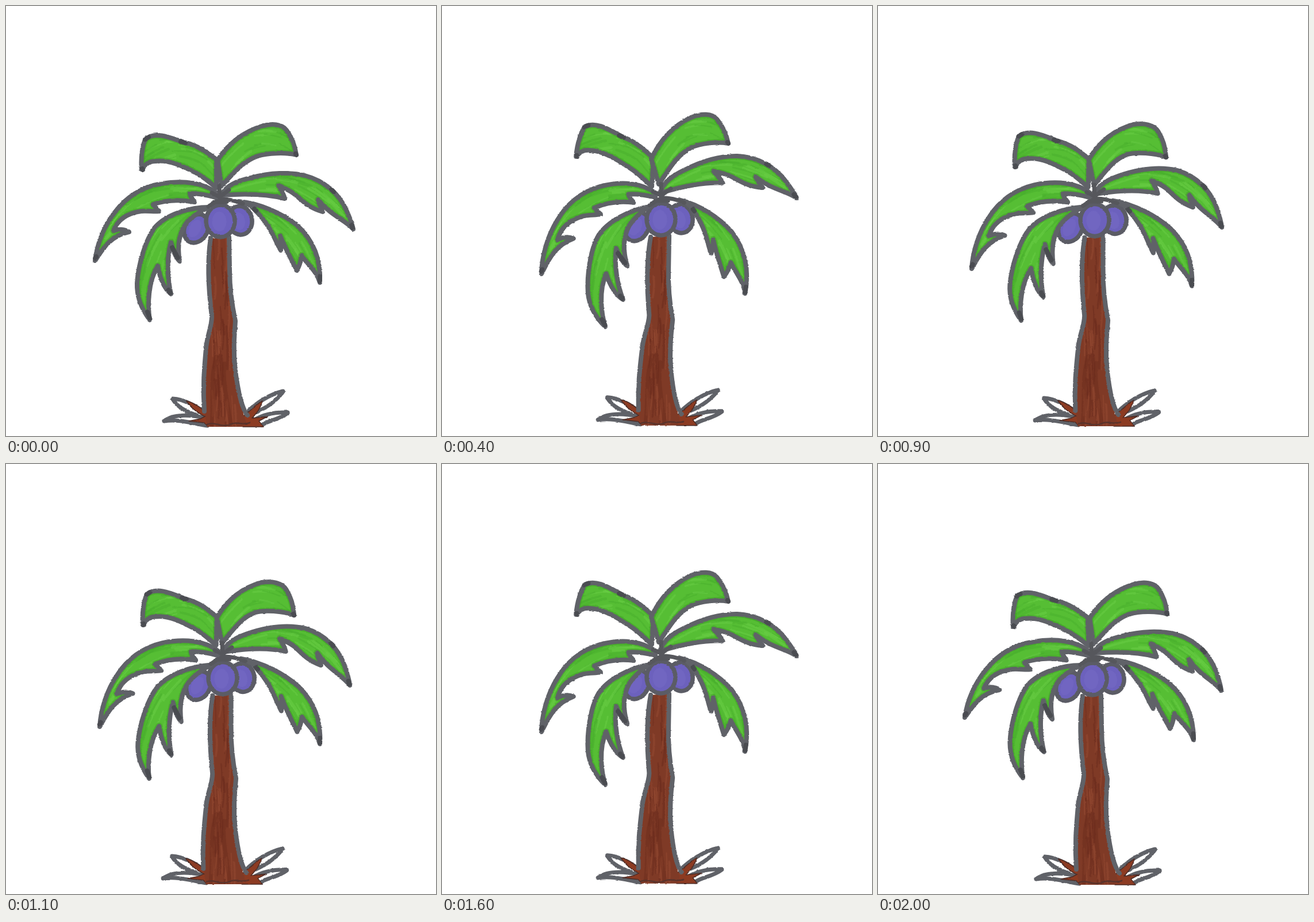
An HTML page that plays this animation: 748 by 748 pixels, repeating every 2100 ms.

```html
<!DOCTYPE html>
<html lang="en">
<head>
<meta charset="utf-8">
<title>Swaying palm</title>
<style>
  html, body { margin: 0; width: 100%; height: 100%; overflow: hidden; background: #fff; }
  svg { display: block; width: 100vw; height: 100vh; }
</style>
</head>
<body>
<svg id="stage" viewBox="0 0 748 748">
  <defs>
    <filter id="rough" x="0" y="0" width="748" height="748" filterUnits="userSpaceOnUse" color-interpolation-filters="sRGB">
      <feTurbulence type="fractalNoise" baseFrequency=".12 .4" numOctaves="2" seed="4"/>
      <feDisplacementMap in="SourceGraphic" scale="2.5" xChannelSelector="R" yChannelSelector="G"/>
    </filter>
  </defs>
  <g id="palm" filter="url(#rough)" stroke-linecap="round" stroke-linejoin="round"></g>
</svg>
<script>
const palm = document.getElementById('palm');
const defs = document.querySelector('defs');
const INK = '#606268', DARK_INK = '#45464b', BROWN = '#7f3a26';
const STEP = 100, LOOP = 2100;

// Sway poses sit at these phases; the first is the far left end.
const PHASES = [-1, 0, 1, 2, 4, 5];
const SWAY = [0, 0, .5, .8, 1, 1.1];

// Spine points are base, middle, tip; shifts are x,y pairs per pose.
const LEAVES = [
  { d: 'M353,350 C320,350 280,362 260,384 C243,405 230,450 228,482 C227,510 238,530 250,546 C246,520 247,480 264,452 C268,475 276,492 287,501 C281,475 279,440 287,411 C291,428 296,438 302,444 C298,420 300,395 315,376 C325,365 340,356 353,350Z',
    spine: [[352, 352], [270, 425], [250, 546]], root: [7, -1], width: 28,
    mid: [1,0, 0,0, 3,4, 7,8, 18,13, 22,14], tip: [2,0, 0,0, -1,1, 5,5, 34,12, 43,13],
    ink: 'M289,420 L299,438 M246,532 L250,543 M283,494 L286,499' },
  { d: 'M405,340 C440,343 480,360 507,382 C535,408 548,440 546,481 C541,462 525,450 514,434 C513,445 510,453 506,460 C496,440 485,420 477,400 C479,410 479,417 478,425 C466,405 463,385 432,354 C428,348 418,342 405,340Z',
    spine: [[410, 340], [495, 390], [546, 482]], root: [8, -2], width: 24,
    mid: [0,0, 0,0, 2,5, 0,8, -4,9, -5,10], tip: [3,-1, 0,0, 0,6, -4,12, -19,19, -23,21],
    ink: 'M546,470 L546,479 M432,353 L435,356' },
  { d: 'M368,326 C345,308 310,302 270,309 C235,315 208,334 190,358 C170,383 158,415 155,443 C167,425 180,400 214,393 C204,387 193,389 187,391 C193,375 207,361 235,357 C247,356 257,358 266,357 C260,351 258,348 256,345 C280,337 305,337 328,341 C323,334 320,330 320,326 C340,326 355,330 368,334Z',
    spine: [[368, 330], [240, 335], [155, 443]], root: [3, -1], width: 26,
    mid: [-1,0, 0,0, 3,4, 6,5, 8,8, 8,9], tip: [-4,-2, 0,0, 8,14, 14,17, 18,23, 19,25],
    ink: 'M155,439 L157,436' },
  { d: 'M376,326 C385,312 400,305 425,299 C455,291 490,288 520,295 C555,304 580,328 592,355 C598,368 602,378 604,388 C590,372 565,365 543,337 C545,346 548,352 551,358 C530,352 520,343 505,330 C497,322 485,317 474,312 C479,320 483,327 485,335 C465,330 430,325 378,329Z',
    spine: [[376, 325], [500, 308], [604, 389]], root: [4, -4], width: 24,
    mid: [0,1, 0,0, 1,-9, 1,-17, -3,-30, -4,-35], tip: [-7,6, 0,0, -6,-3, -3,-17, 13,-54, 18,-67],
    ink: 'M566,319 L570,323 M601,381 L603,386' },
  { d: 'M237,285 C240,278 246,270 260,270 C285,267 310,280 330,290 C345,298 355,308 366,316 L366,267 C350,255 335,243 312,238 C290,231 262,217 243,231 C238,240 234,262 236,285Z',
    spine: [[368, 300], [310, 258], [238, 286]], root: [0, -2], width: 34,
    mid: [-2,0, 0,0, 1,-3, 2,-7, 1,-10, 1,-13], tip: [-1,-2, 0,0, 2,-5, 0,-12, -3,-23, -4,-28],
    ink: 'M242,232 L248,228 M304,236 L312,238 M237,283 L238,285' },
  { d: 'M368,268 C388,238 415,218 445,209 C462,204 480,205 488,216 C497,228 503,245 505,259 C485,254 455,256 438,261 C410,271 395,292 375,313Z',
    spine: [[370, 298], [435, 237], [505, 260]], root: [0, -2], width: 34,
    mid: [0,0, 0,0, -3,-3, -6,-6, -8,-14, -9,-18], tip: [-2,2, 0,0, -4,4, -7,2, -7,-20, -6,-26],
    ink: 'M504,257 L505,259' }
];

const TRUNK_LEFT = 'M356,404 C349,450 353,500 358,540 C358,558 350,572 348,595 C345,630 342,660 345,705';
const TRUNK_RIGHT = 'M388,402 L389,460 C389,490 392,515 399,548 C397,575 395,600 399,635 C403,665 410,700 420,712';
const TRUNK_FILL = TRUNK_LEFT + ' L350,732 L413,732 L418,724 C410,705 403,665 399,635 C395,600 397,575 399,548 C392,515 389,490 389,460 L388,402Z';
const GRASS = 'M290,683 C310,684 330,696 348,708 M290,684 C298,697 310,704 332,712 M275,722 C292,709 320,711 345,716 M275,722 C300,718 325,726 350,730 M482,670 C460,675 435,690 418,708 M482,671 C470,687 455,698 436,706 M490,707 C465,706 445,712 432,720 M490,708 C475,720 455,721 445,729';
const ROOTS = 'M314,687 C330,691 340,700 351,710 L352,732 L345,725 L318,722 L338,718 L346,714 C332,707 321,699 314,687Z M446,687 C436,692 424,706 413,713 L412,732 L448,732 L440,722 L455,714 L428,717 C436,708 443,700 446,687Z';
const CROWN = 'M352,349 C360,343 367,338 374,336 C388,336 400,339 412,344 M358,325 L372,332 L388,320 M371,312 L372,338 M362,341 L384,341';

let seed = 11;
const random = () => (seed = seed * 16807 % 2147483647) / 2147483647;
const between = (a, b) => a + (b - a) * random();

function add(parent, tag, attrs) {
  const node = document.createElementNS('http://www.w3.org/2000/svg', tag);
  for (const key in attrs) node.setAttribute(key, attrs[key]);
  return parent.appendChild(node);
}

const parts = [];
function addPath(parent, d, warp, fill, stroke = 'none', width = 0, opacity = 1) {
  const node = add(parent, 'path', { fill, stroke, 'stroke-width': width, opacity });
  parts.push({ node, d, warp });
}

function addClip(id, d, warp) {
  addPath(add(defs, 'clipPath', { id }), d, warp, '#000');
  return add(palm, 'g', { 'clip-path': `url(#${id})` });
}

const pair = ([x, y]) => `${x.toFixed(1)},${y.toFixed(1)}`;
const warpPath = (d, warp) => d.replace(/(-?[\d.]+),(-?[\d.]+)/g, (_, x, y) => pair(warp(+x, +y)));

function keyed(values, phase, size, offset) {
  let i = 0;
  while (i < PHASES.length - 2 && phase > PHASES[i + 1]) i++;
  const k = (phase - PHASES[i]) / (PHASES[i + 1] - PHASES[i]);
  const a = values[i * size + offset], b = values[(i + 1) * size + offset];
  return a + (b - a) * k;
}

let phase = 0, sway = 0;

// Trunk, roots and crown lean together.
const lean = (x, y) => [x + sway * (-4 + (730 - y) / 325 * 11), y - sway * 2.2];

const along = (s, u) => [0, 1].map(k =>
  s[0][k] * (1 - u) * (1 - 2 * u) + s[1][k] * 4 * u * (1 - u) + s[2][k] * u * (2 * u - 1));
const heading = (s, u) => {
  const [dx, dy] = [0, 1].map(k =>
    s[0][k] * (4 * u - 3) + s[1][k] * (4 - 8 * u) + s[2][k] * (4 * u - 1));
  return Math.atan2(dy, dx);
};

// Carries a point along with the bending spine of its leaf.
function bend(leaf) {
  return (x, y) => {
    const [base, , tip] = leaf.spine;
    const cx = tip[0] - base[0], cy = tip[1] - base[1];
    const t = ((x - base[0]) * cx + (y - base[1]) * cy) / (cx * cx + cy * cy);
    const u = Math.max(0, Math.min(1, t));
    const [sx, sy] = along(leaf.spine, u), [px, py] = along(leaf.posed, u);
    const turn = heading(leaf.posed, u) - heading(leaf.spine, u);
    const c = Math.cos(turn), s = Math.sin(turn);
    return [px + (x - sx) * c - (y - sy) * s, py + (x - sx) * s + (y - sy) * c];
  };
}

function poseLeaf(leaf) {
  const shifts = [
    leaf.root.map(v => v * sway),
    [0, 1].map(k => keyed(leaf.mid, phase, 2, k)),
    [0, 1].map(k => keyed(leaf.tip, phase, 2, k))
  ];
  leaf.posed = leaf.spine.map((p, i) => p.map((v, k) => v + shifts[i][k]));
}

function leafStreak(leaf) {
  const start = between(0, .85), length = between(.12, .3), offset = between(-leaf.width, leaf.width);
  const at = u => {
    const [x, y] = along(leaf.spine, u), a = heading(leaf.spine, u);
    return pair([x - Math.sin(a) * offset, y + Math.cos(a) * offset]);
  };
  return `M${at(start)} Q${at(start + length / 2)} ${at(start + length)}`;
}

function buildTrunk() {
  addPath(palm, GRASS, lean, 'none', INK, 7);
  addPath(palm, ROOTS, lean, '#8c3b22', '#4d2d27', 1.5);
  addPath(palm, TRUNK_FILL, lean, BROWN);
  const grain = addClip('trunk', TRUNK_FILL, lean);
  for (let i = 0; i < 46; i++) {
    const y = between(400, 700), x = between(352, 392) + (y > 600 ? between(-6, 10) : 0);
    const length = between(25, 75);
    const streak = `M${pair([x, y])} Q${pair([x + 3, y + length / 2])} ${pair([x + between(-2, 4), y + length])}`;
    addPath(grain, streak, lean, 'none', i % 2 ? '#6b2b1c' : '#964a33', between(1.5, 4), .5);
  }
  addPath(grain, 'M366,610 C354,650 362,680 358,728 M380,622 C376,650 385,690 391,725', lean, 'none', '#682a1a', 7, .4);
  addPath(palm, TRUNK_LEFT, lean, 'none', INK, 8);
  addPath(palm, TRUNK_RIGHT, lean, 'none', INK, 8);
  addPath(palm, 'M350,728 C365,722 375,735 392,727 C403,722 410,730 424,725', lean, 'none', '#59332b', 2.5);
}

const fruits = [];
function addFruit(cx, cy, rx, ry, tilt) {
  const node = add(palm, 'g', {});
  const transform = `rotate(${tilt} ${cx} ${cy})`;
  add(node, 'ellipse', { cx, cy, rx, ry, transform, fill: '#6c61bd', stroke: '#5b5c65', 'stroke-width': 7.5 });
  add(node, 'ellipse', { cx: cx - 2, cy: cy + 1, rx: rx * .5, ry: ry * .62, transform, fill: '#766bc6', opacity: .5 });
  fruits.push(node);
}

function buildLeaf(leaf, i) {
  poseLeaf(leaf);
  const warp = bend(leaf);
  addPath(palm, leaf.d, warp, '#56be34');
  const inside = addClip('leaf' + i, leaf.d, warp);
  for (let n = 0; n < 32; n++)
    addPath(inside, leafStreak(leaf), warp, 'none', n % 2 ? '#49af2c' : '#6bd046', between(2, 5), .5);
  addPath(inside, leaf.d, warp, 'none', '#3f9f27', 12, .5);
  addPath(palm, leaf.d, warp, 'none', INK, 8);
  addPath(palm, leaf.ink, warp, 'none', DARK_INK, 8, .8);
}

buildTrunk();
addFruit(331, 387, 20, 26, 28);
addFruit(407, 373, 21, 25, -10);
addFruit(373, 374, 25, 28, 0);
LEAVES.forEach(buildLeaf);
addPath(palm, CROWN, lean, 'none', '#56575c', 7);

function draw(frame) {
  const n = frame % 10;
  phase = frame && !n ? -1 : 5 - Math.abs(5 - n);
  sway = keyed(SWAY, phase, 1, 0);
  LEAVES.forEach(poseLeaf);
  for (const { node, d, warp } of parts) node.setAttribute('d', warpPath(d, warp));
  for (const node of fruits) node.setAttribute('transform', `translate(${sway * 8} ${sway * -3})`);
}

let shown = -1;
const begin = performance.now();
function tick() {
  const frame = Math.floor((performance.now() - begin) % LOOP / STEP);
  if (frame !== shown) draw(shown = frame);
  requestAnimationFrame(tick);
}
tick();
</script>
</body>
</html>
```
